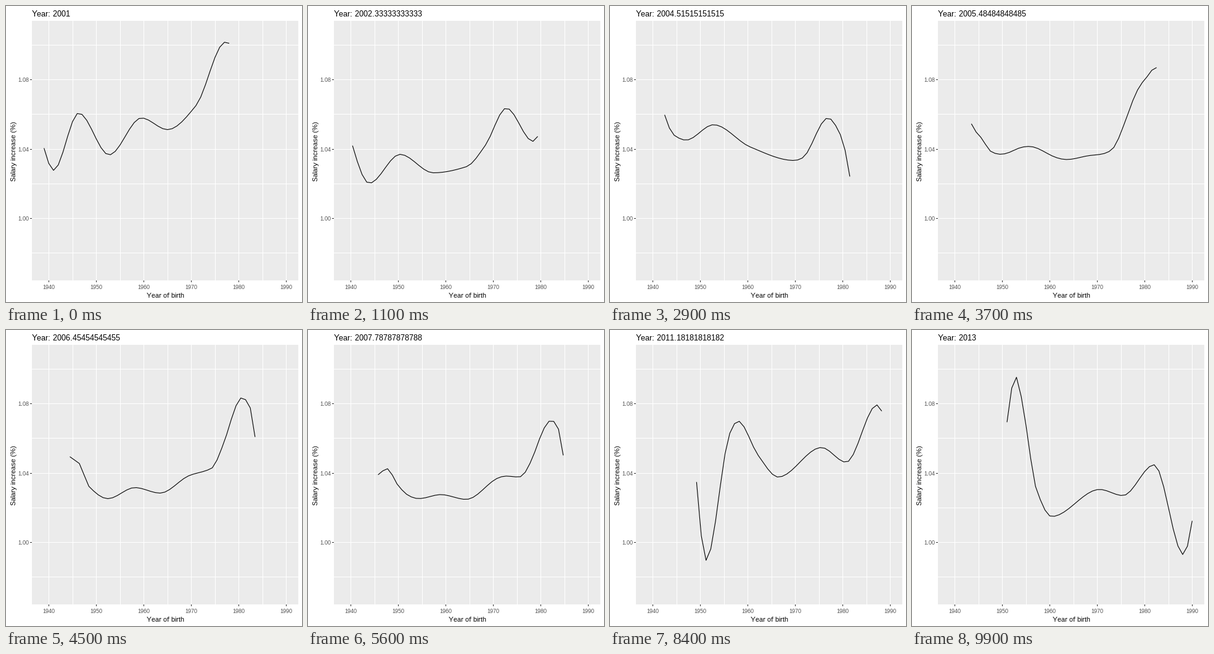
Animation of 480 by 480 pixels, one loop 10 s. Source, as a matplotlib script:

```python
import numpy as np
import matplotlib.pyplot as plt
from matplotlib.animation import FuncAnimation
from matplotlib.patches import Rectangle

SIZE, DPI = 480, 100
FRAMES, INTERVAL = 100, 100
FIRST, LAST = 2001, 2013
LEFT, RIGHT, TOP, BOTTOM = 42, 474, 24, 445
X1940, PER_YEAR = 69.34, 7.7
Y_ONE, PER_STEP = 344.2, 56.25  # height of 1.00, pixels per 0.02

plt.rcParams.update({"font.family": "Liberation Sans",
                     "text.hinting": "native", "text.hinting_factor": 1})
ROWS = np.arange(1, 41)


def smooth(*points):
    """Monotone cubic through the points, flat at every turning point."""
    x, y = np.array(points, float).T
    h, d = np.diff(x), np.diff(y) / np.diff(x)
    a, b = d[:-1], d[1:]
    same = a * b > 0
    inner = np.where(same, 2 * a * b / np.where(same, a + b, 1), 0)
    m = np.concatenate([[1.5 * d[0]], inner, [1.5 * d[-1]]])
    j = np.clip(np.searchsorted(x, ROWS, side="right") - 1, 0, len(h) - 1)
    u = (ROWS - x[j]) / h[j]
    return (y[j] + (y[j + 1] - y[j]) * u * u * (3 - 2 * u)
            + h[j] * u * (1 - u) * (m[j] * (1 - u) - m[j + 1] * u))


def two_years(shape, t, swing):
    """The same shape twice, its young end swinging; it rests at blend t."""
    tail = swing * np.exp((ROWS - 40) / 2)
    return [shape - t * tail, shape + (1 - t) * tail]


# Turning points as (row, height in pixels); row 1 is the oldest cohort.
start = smooth((1, 230), (3, 266), (8.3, 173), (14.7, 241), (21.5, 181),
               (27, 200), (33, 161), (39.2, 58), (40, 60))
hump = smooth((1, 226), (4.5, 287), (11, 240), (18, 270), (25, 260),
              (29, 225), (33.4, 165), (39, 219), (40, 211))
bell = smooth((1, 176), (3, 209), (5.5, 217), (11.3, 192), (19, 228),
              (28.3, 250), (30, 246), (35.4, 181), (38, 208), (40, 276))
cliff = smooth((1, 205), (3, 216), (5, 253), (9, 273), (14.7, 255), (20, 264),
               (26, 236), (31, 223), (33, 191), (37.3, 109), (39, 126),
               (40, 173))
rise = smooth((1, 283), (3.7, 234), (7, 264), (13, 282), (19, 292),
              (27.4, 244), (31.8, 262), (36, 207), (39.2, 166), (40, 168))
plunge = smooth((1, 246), (3, 373), (8, 167), (9.7, 147), (14, 203),
                (18.2, 238), (27.3, 190), (32.5, 214), (39, 121), (40, 131))
finish = smooth((1, 149), (2.8, 75), (5, 154), (7, 253), (10.4, 302),
                (20.5, 258), (25.4, 268), (32, 218), (38.2, 364), (40, 309))

CURVES = np.array([
    start,
    *two_years(hump, 3 / 8, -51),
    *two_years(bell, 1 / 2, -298),
    *two_years(cliff, 4 / 9, 228),
    (cliff + rise) / 2,
    *two_years(rise, 1 / 4, 0),
    *two_years(plunge, 2 / 9, 308),
    finish])
# Each year lands on a whole frame.
STOPS = np.rint(np.linspace(0, FRAMES - 1, len(CURVES)))

fig = plt.figure(figsize=(SIZE / DPI, SIZE / DPI), dpi=DPI, facecolor="white")
ax = fig.add_axes([0, 0, 1, 1])
ax.set(xlim=(0, SIZE), ylim=(SIZE, 0))
ax.axis("off")


def box(x, y, w, h, color):
    ax.add_patch(Rectangle((x, y), w, h, fc=color, lw=0, aa=False))


def label(x, y, text, px, color="black", **kw):
    kw = {"ha": "center", "va": "baseline", **kw}
    return ax.text(x, y, text, fontsize=px * 72 / DPI, color=color, **kw)


box(LEFT, TOP, RIGHT - LEFT, BOTTOM - TOP, "#EBEBEB")
for year in range(1940, 1991, 5):
    x = round(X1940 + (year - 1940) * PER_YEAR)
    box(x, TOP, 1, BOTTOM - TOP, "white")
    if year % 10 == 0:
        box(x, BOTTOM, 1, 3, "#333333")
        label(x + 0.5, 459, str(year), 9, "#4D4D4D")
for k in range(-1, 6):
    y = round(Y_ONE - k * PER_STEP)
    box(LEFT, y, RIGHT - LEFT, 1, "white")
    if k in (0, 2, 4):
        box(LEFT - 3, y, 3, 1, "#333333")
        label(37, y + 4, f"{1 + 0.02 * k:.2f}", 9, "#4D4D4D", ha="right")

label(258, 473, "Year of birth", 11)
label(16, 235.5, "Salary increase (%)", 11, rotation=90,
      rotation_mode="anchor")
title = label(42, 17, "", 13, ha="left")
line, = ax.plot([], [], color="black", lw=0.8, snap=False,
                solid_joinstyle="round", solid_capstyle="butt")


def draw(i):
    year = FIRST + (LAST - FIRST) * i / (FRAMES - 1)
    pos = np.interp(i, STOPS, np.arange(len(CURVES)))
    j = min(int(pos), len(CURVES) - 2)
    t = pos - j
    ys = (1 - t) * CURVES[j] + t * CURVES[j + 1]
    line.set_data(X1940 + (ROWS - 2 + pos) * PER_YEAR, ys + 0.5)
    title.set_text(f"Year: {year:.15g}")
    return line, title


anim = FuncAnimation(fig, draw, frames=FRAMES, interval=INTERVAL,
                     repeat=True, repeat_delay=0)
plt.show()
```
